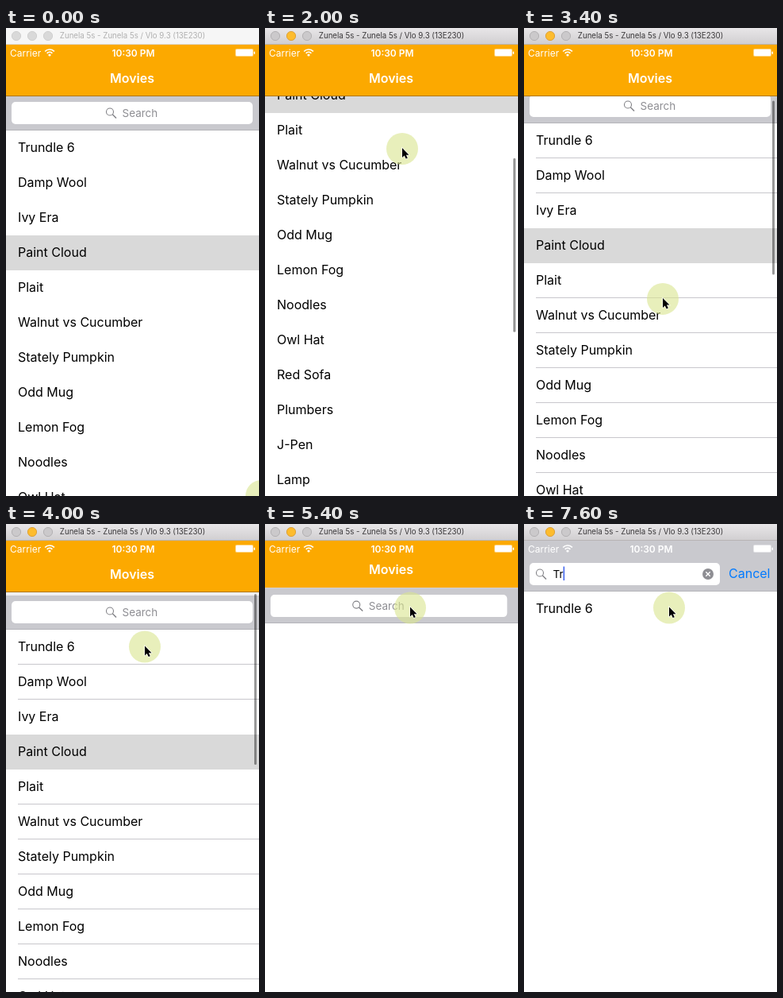
These frames come from a looping animation (319 by 589 pixels, 8 s). An HTML page with a canvas:

```html
<!DOCTYPE html>
<html lang="en">
<head>
<meta charset="utf-8">
<title>Movie search</title>
<style>
  html, body { margin: 0; width: 100%; height: 100%; overflow: hidden; background: #fff; }
  canvas { display: block; }
</style>
</head>
<body>
<canvas id="stage" width="319" height="589"></canvas>
<script>
const ctx = document.getElementById('stage').getContext('2d');
const W = 319, H = 589, LOOP = 8000, STEP = 200, ROW = 44;
const ORANGE = '#fca900', BAR_GRAY = '#c9c9ce', HINT = '#8e8e93';
const ARROW = new Path2D('M0 0V12L2.7 9.6L4.7 13.6L6.8 12.7L4.9 8.7H8.5Z');

const movies = ['Trundle 6', 'Damp Wool', 'Ivy Era', 'Paint Cloud', 'Plait',
  'Walnut vs Cucumber', 'Stately Pumpkin', 'Odd Mug', 'Lemon Fog', 'Noodles',
  'Owl Hat', 'Red Sofa', 'Plumbers', 'J-Pen', 'Lamp'];
const SELECTED = 3;

const FOCUS = 5800, TYPE_T = 6800, TYPE_R = 7600;
const DRAG_UP = 198, OVERSHOOT = 14.5, DRAG_DOWN = DRAG_UP + OVERSHOOT;

const lerp = (a, b, k) => a + (b - a) * k;
const ramp = (t, from, to) => Math.min(1, Math.max(0, (t - from) / (to - from)));
const smooth = (t, from, to) => {
  const k = ramp(t, from, to);
  return k * k * (3 - 2 * k);
};

const draggedUp = t => DRAG_UP * ramp(t, 1600, 2000);
const draggedDown = t => DRAG_DOWN * ramp(t, 2600, 3500);
const scrollAt = t => draggedUp(t) - draggedDown(t) + OVERSHOOT * ramp(t, 3500, 4150);
const indicatorAt = t => ramp(t, 1600, 1800) - ramp(t, 2000, 2400)
  + ramp(t, 2600, 2800) - ramp(t, 4000, 4400);

// Glide in, reach down, drag the list both ways, then move to the search field.
function pointerAt(t) {
  const arrive = smooth(t, 0, 1400), reach = ramp(t, 1400, 1600), leave = ramp(t, 4000, 4800);
  return [
    322 - 159 * arrive + 10 * reach + 2 * ramp(t, 2600, 3000) + 8 * leave,
    589 - 444 * arrive + 205 * reach - draggedUp(t) + draggedDown(t)
      - 210 * ramp(t, 3500, 4000) - 49 * leave
  ];
}

function rect(x, y, w, h, fill, radius = 0) {
  ctx.fillStyle = fill;
  ctx.beginPath();
  ctx.roundRect(x, y, w, h, radius);
  ctx.fill();
}

function disc(x, y, r, fill, stroke) {
  ctx.beginPath();
  ctx.arc(x, y, r, 0, Math.PI * 2);
  ctx.fillStyle = fill;
  ctx.fill();
  if (stroke) { ctx.strokeStyle = stroke; ctx.lineWidth = 1; ctx.stroke(); }
}

function arc(x, y, r, from, to, color, width) {
  ctx.strokeStyle = color;
  ctx.lineWidth = width;
  ctx.beginPath();
  ctx.arc(x, y, r, from * Math.PI, to * Math.PI);
  ctx.stroke();
}

function line(x1, y1, x2, y2, color) {
  ctx.strokeStyle = color;
  ctx.lineWidth = 1.4;
  ctx.beginPath();
  ctx.moveTo(x1, y1);
  ctx.lineTo(x2, y2);
  ctx.stroke();
}

function text(str, x, y, size, fill, align = 'left', weight = 400) {
  ctx.font = `${weight} ${size}px Inter, sans-serif`;
  ctx.textAlign = align;
  ctx.fillStyle = fill;
  ctx.fillText(str, x, y);
}

function windowBar(active) {
  const shade = ctx.createLinearGradient(0, 0, 0, 21);
  shade.addColorStop(0, active ? '#e8e6e8' : '#f6f6f6');
  shade.addColorStop(1, active ? '#d0ced0' : '#f6f6f6');
  rect(0, 0, W, 21, shade);
  rect(0, 20, W, 1, active ? '#b8b4b4' : '#dddad6');
  for (let i = 0; i < 3; i++) {
    const lit = active && i === 1;
    disc(13 + 20 * i, 10, 5.6, lit ? '#fdbc2e' : active ? '#cbc9cb' : '#d9d9d9',
      lit ? '#dea034' : active ? '#b3b1b3' : '#cfcfcf');
  }
  text('Zunela 5s - Zunela 5s / Vlo 9.3 (13E230)', 159.5, 13, 9.7,
    active ? '#3a383a' : '#b0b0b0', 'center');
}

function statusBar() {
  text('Carrier', 5, 35.5, 12, '#fff');
  text('10:30 PM', 160.5, 35.5, 12, '#fff', 'center', 600);
  for (const r of [4.6, 8]) arc(55, 35, r, -.76, -.24, '#fff', 1.6);
  disc(55, 34, 1.6, '#fff');
  rect(289, 26, 23, 10, 'rgba(255,255,255,.5)', 2);
  rect(290, 27, 21, 8, '#fff', 1);
  rect(312.5, 29.5, 1.5, 3.5, '#fff', 1);
}

function rows(items, top, ruled, selected = -1) {
  items.forEach((name, i) => {
    const y = top + i * ROW;
    if (i === selected) rect(0, y, W, ROW, '#d9d9d9');
    else if (ruled && i !== selected - 1) rect(15, y + ROW - 1, W - 15, 1, '#c8c7cc');
    text(name, 15, y + 27, 16, '#000');
  });
}

function searchBar(p, offset, query, caret) {
  const top = lerp(86, 21, p) - offset, bottom = lerp(129, 85, p) - offset;
  const box = lerp(93, 49, p) - offset, right = lerp(311, 247, p);
  const slide = Math.min(1, p * 1.6);
  const iconX = lerp(126, 15, slide), textX = lerp(146.5, 36.5, slide);
  rect(0, top, W, bottom - top, BAR_GRAY);
  rect(0, bottom - 1, W, 1, '#b4b4b9');
  rect(7, box, right - 7, 28, '#fff', 5);

  arc(iconX + 5, box + 12.5, 4.5, 0, 2, '#808085', 1.1);
  line(iconX + 8.3, box + 15.8, iconX + 13, box + 20.5, '#808085');
  text(query || 'Search', textX, box + 18.5, 13.5, query ? '#000' : HINT);
  if (caret) {
    const typed = query ? ctx.measureText(query).width : -1;
    rect(textX + typed, box + 4.5, 1.6, 17.5, '#4468ee');
  }
  if (query) {
    disc(232, box + 14, 7, HINT);
    for (const d of [-2.7, 2.7]) line(232 - d, box + 11.3, 232 + d, box + 16.7, '#fff');
  }
  if (p) text('Cancel', lerp(324, 258, p), box + 19, 16, '#007aff');
}

function pointer(x, y) {
  disc(x, y, 20, 'rgba(218,230,145,.62)');
  ctx.save();
  ctx.translate(x, y - 1);
  ctx.strokeStyle = '#fff';
  ctx.lineWidth = 1.2;
  ctx.stroke(ARROW);
  ctx.fillStyle = '#000';
  ctx.fill(ARROW);
  ctx.restore();
}

function draw(t) {
  const p = smooth(t, 5310, FOCUS);
  const position = scrollAt(t), offset = Math.floor(position);
  const query = t >= TYPE_R ? 'Tr' : t >= TYPE_T ? 'T' : '';
  const caret = [FOCUS, TYPE_T, TYPE_R].some(start => t >= start && t < start + 400);

  rect(0, 0, W, H, '#fff');
  if (!p) {
    rect(0, 86, W, -Math.min(offset, 0), '#efeff2');
    // Hairlines only show between whole-pixel scroll positions.
    rows(movies, 129 - offset, position % 1 !== 0, SELECTED);
    searchBar(0, offset, '', false);
    rect(313, 88 + .382 * Math.max(0, position), 3, 219 + Math.min(offset, 0),
      `rgba(0,0,0,${.4 * indicatorAt(t)})`, 1.5);
  } else if (query) {
    rows(movies.filter(name => name.toLowerCase().includes(query.toLowerCase())), 85, false);
  }

  rect(0, 21, W, lerp(65, 0, p), ORANGE);
  if (!p) rect(0, 85, W, 1, 'rgba(0,0,0,.3)');
  if (p < 1) {
    ctx.globalAlpha = Math.min(1, 1.2 - p);
    text('Movies', 159, 69 - 65 * p, 16, '#fff', 'center', 600);
    ctx.globalAlpha = 1;
  }
  if (p) searchBar(p, 0, query, caret);
  statusBar();
  windowBar(t >= 1600);
  pointer(...pointerAt(t));
}

function frame() {
  const t = performance.now() % LOOP;
  draw(Math.floor(t / STEP) * STEP);
  requestAnimationFrame(frame);
}
frame();
</script>
</body>
</html>
```
